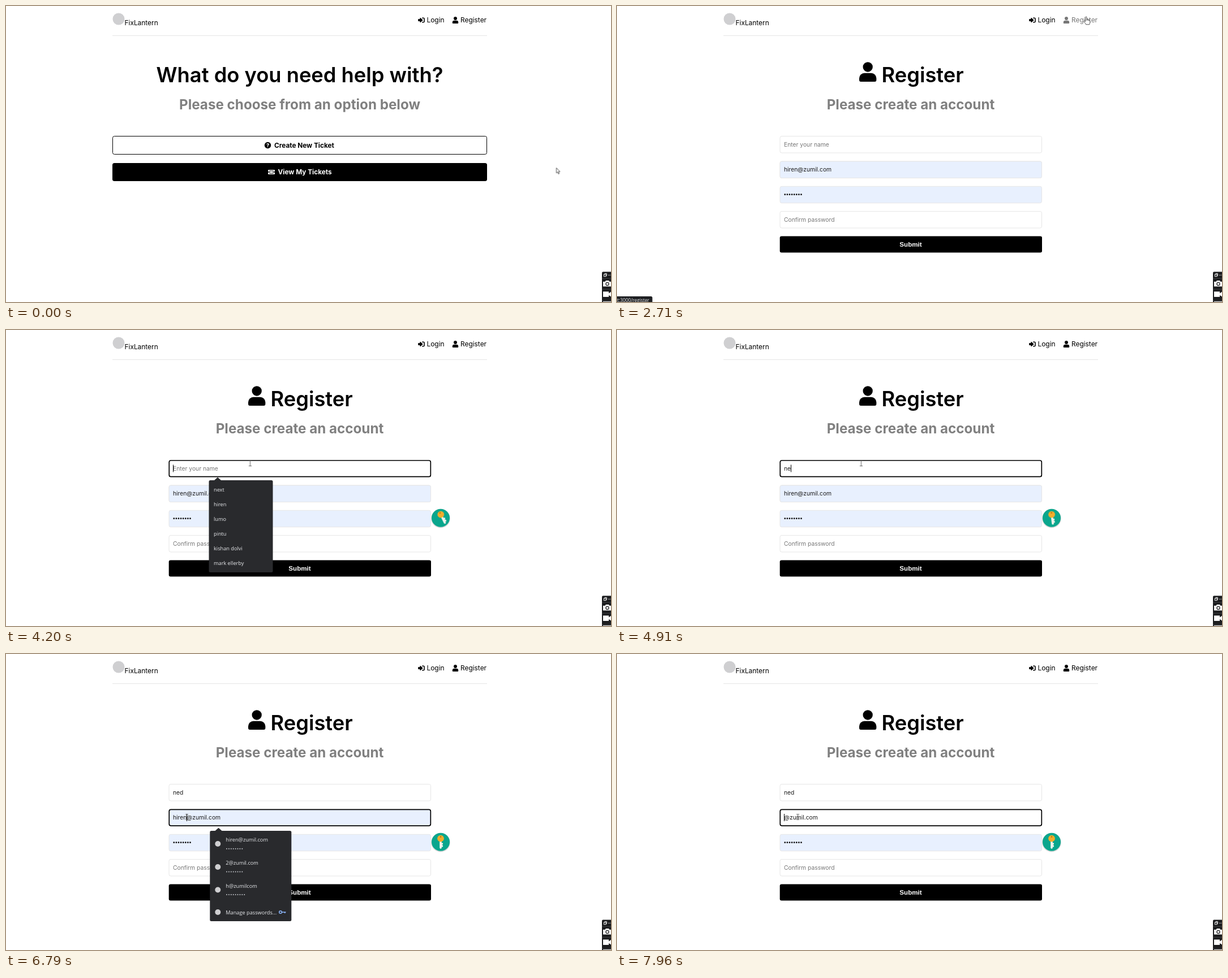
Animation of 1069 by 524 pixels, one loop 8 s. Source, as an HTML page:

```html
<!DOCTYPE html>
<html lang="en">
<head>
<meta charset="utf-8">
<title>Help desk sign-up</title>
<style>
  html, body { margin: 0; width: 100%; height: 100%; overflow: hidden; background: #fff; }
  svg { display: block; width: 1069px; height: 524px; }
  text { font-family: Inter, "Open Sans", sans-serif; white-space: pre; }
  .mid { text-anchor: middle; }
  .nav { font-size: 11.9px; }
  .h1 { font-size: 36.3px; font-weight: 600; }
  .h2 { font-size: 24.2px; font-weight: 700; fill: #808080; }
  .btn { font-size: 11.8px; font-weight: 700; }
  .in { font-size: 10.3px; fill: #1c1c1c; }
  .hint { font-size: 10.3px; fill: #777; }
  .submit { font: 700 11.6px "Liberation Sans", Arial, sans-serif; fill: #fff; }
  .pop text { font: 9.2px "Open Sans", "Noto Sans", sans-serif; fill: #e8eaed; }
  .pop { fill: #292a2d; }
  .field { fill: #fff; stroke: #e6e6e6; }
  .auto { fill: #e8f0fe; }
  .focus { fill: none; stroke: #000; stroke-width: 1.7; }
  .dots { fill: none; stroke-linecap: round; }

  /* 1% of the loop is 80 ms */
  .s { animation: 8s step-end infinite; }
  .m { animation: 8s linear infinite; }

  .home { animation-name: home; }
  .reg { animation-name: reg; }
  .link { animation-name: link; }
  .status { animation-name: status; }
  @keyframes home { 0% { opacity: 1 } 33.875%, 100% { opacity: 0 } }
  @keyframes reg { 0% { opacity: 0 } 33.875%, 100% { opacity: 1 } }
  @keyframes link { 0% { fill: #000 } 17.2% { fill: #777 } 40.6%, 100% { fill: #000 } }
  @keyframes status { 0%, 21% { opacity: 0 } 21.75%, 44.2% { opacity: 1 } 45.5%, 100% { opacity: 0 } }

  /* name field */
  .focus1 { animation-name: focus1; }
  .hint1 { animation-name: hint1; }
  .n1 { animation-name: n1; }
  .n2 { animation-name: n2; }
  .n3 { animation-name: n3; }
  .caret1 { animation-name: caret1; }
  .pop1 { animation-name: pop1; }
  @keyframes focus1 { 0% { opacity: 0 } 48.125% { opacity: 1 } 84.5%, 100% { opacity: 0 } }
  @keyframes hint1 { 0% { opacity: 1 } 55%, 100% { opacity: 0 } }
  @keyframes n1 { 0% { opacity: 0 } 55% { opacity: 1 } 59.375%, 100% { opacity: 0 } }
  @keyframes n2 { 0% { opacity: 0 } 59.375% { opacity: 1 } 63%, 100% { opacity: 0 } }
  @keyframes n3 { 0% { opacity: 0 } 63%, 100% { opacity: 1 } }
  @keyframes caret1 {
    0% { opacity: 0; transform: none }
    48.125% { opacity: 1; transform: none }
    55% { opacity: 1; transform: translateX(6px) }
    59.375% { opacity: 1; transform: translateX(12px) }
    63% { opacity: 1; transform: translateX(19px) }
    70% { opacity: 0; transform: translateX(19px) }
    76.25% { opacity: 1; transform: translateX(19px) }
    82.625%, 100% { opacity: 0; transform: translateX(19px) }
  }
  @keyframes pop1 { 0%, 49% { opacity: 0 } 49.8%, 55.25% { opacity: 1 } 57.75%, 100% { opacity: 0 } }

  /* e-mail field */
  .fill2 { animation-name: fill2; }
  .focus2 { animation-name: focus2; }
  .e0 { animation-name: e0; }
  .e1 { animation-name: e1; }
  .e2 { animation-name: e2; }
  .e3 { animation-name: e3; }
  .e4 { animation-name: e4; }
  .e5 { animation-name: e5; }
  .caret2 { animation-name: caret2; }
  .pop2 { animation-name: pop2; }
  @keyframes fill2 { 0% { opacity: 1 } 88.625%, 100% { opacity: 0 } }
  @keyframes focus2 { 0% { opacity: 0 } 84.5%, 100% { opacity: 1 } }
  @keyframes e0 { 0% { opacity: 1 } 88.625%, 100% { opacity: 0 } }
  @keyframes e1 { 0% { opacity: 0 } 88.625% { opacity: 1 } 91.125%, 100% { opacity: 0 } }
  @keyframes e2 { 0% { opacity: 0 } 91.125% { opacity: 1 } 93.25%, 100% { opacity: 0 } }
  @keyframes e3 { 0% { opacity: 0 } 93.25% { opacity: 1 } 95.75%, 100% { opacity: 0 } }
  @keyframes e4 { 0% { opacity: 0 } 95.75% { opacity: 1 } 99.45%, 100% { opacity: 0 } }
  @keyframes e5 { 0% { opacity: 0 } 99.45%, 100% { opacity: 1 } }
  @keyframes caret2 {
    0% { opacity: 0; transform: translateX(24px) }
    84.5% { opacity: 1; transform: translateX(24px) }
    88.625% { opacity: 1; transform: translateX(19px) }
    91.125% { opacity: 1; transform: translateX(13px) }
    93.25% { opacity: 1; transform: translateX(8px) }
    95.75% { opacity: 0; transform: translateX(6px) }
    97.75% { opacity: 1; transform: translateX(6px) }
    99.45%, 100% { opacity: 1; transform: none }
  }
  @keyframes pop2 { 0%, 84.375% { opacity: 0 } 84.875%, 88.625% { opacity: 1 } 91.125%, 100% { opacity: 0 } }

  /* key badge */
  .badge { animation-name: badge; transform-origin: 768px 333px; }
  .key { animation-name: grow; transform-origin: 768px 326px; }
  .swing { animation: swing 8s ease-in-out infinite; transform-origin: 768px 326px; }
  .shaft { animation-name: shaft; transform-origin: 768px 326px; }
  @keyframes badge { 0%, 37% { transform: scale(0) } 38.8%, 100% { transform: none } }
  @keyframes grow { 0%, 38.6% { transform: scale(0) } 39.625% { transform: scale(.58) } 41.5%, 100% { transform: none } }
  @keyframes shaft { 0%, 39.7% { transform: scaleY(0) } 41.8%, 100% { transform: none } }
  @keyframes swing {
    0%, 42.5% { transform: none }
    45.6%, 52.5% { transform: rotate(-26deg) }
    49%, 56% { transform: rotate(26deg) }
    59.5% { transform: rotate(-14deg) }
    63.3%, 100% { transform: none }
  }

  /* pointer */
  .pointer { animation: path 8s ease-in-out infinite; }
  .arrow { animation-name: arrow; }
  .hand { animation-name: hand; }
  .beam { animation-name: beam; }
  @keyframes path {
    0%, 8.25% { transform: translate(972.5px, 286.5px) }
    11.875%, 15.625% { transform: translate(819.5px, 30.5px) }
    17.2% { transform: translate(827px, 2px) }
    18.375% { transform: translate(828px, 13px) }
    21.75%, 24.25% { transform: translate(829px, 18px) }
    25.125%, 40% { transform: translate(829px, 19px) }
    43.75% { transform: translate(560px, 233px) }
    46.5%, 71% { transform: translate(431.5px, 236px) }
    74.375% { transform: translate(296.5px, 270.5px) }
    79.75%, 100% { transform: translate(319.5px, 288.5px) }
  }
  @keyframes arrow { 0% { opacity: 1 } 16.2% { opacity: 0 } 40.6% { opacity: 1 } 43.8% { opacity: 0 } 73.1% { opacity: 1 } 76.4%, 100% { opacity: 0 } }
  @keyframes hand { 0% { opacity: 0 } 16.2% { opacity: 1 } 40.6%, 100% { opacity: 0 } }
  @keyframes beam { 0% { opacity: 0 } 43.8% { opacity: 1 } 73.1% { opacity: 0 } 76.4%, 100% { opacity: 1 } }
</style>
</head>
<body>
<svg viewBox="0 0 1069 524">
  <defs>
    <g id="user">
      <circle cx="224" cy="128" r="128"/>
      <path d="M0 470V422A134 134 0 0 1 134 288H314A134 134 0 0 1 448 422V470A42 42 0 0 1 406 512H42A42 42 0 0 1 0 470Z"/>
    </g>
  </defs>
  <rect width="1069" height="524" fill="#fff"/>

  <!-- header -->
  <circle cx="199" cy="23" r="10.5" fill="#cfcfd1"/>
  <text class="nav" x="209.5" y="33.5">FixLantern</text>
  <g transform="translate(728 19) scale(.0235)">
    <path d="M24 190H165V90L355 256L165 422V322H24Z" stroke="#000" stroke-width="36" stroke-linejoin="round"/>
    <path d="M330 96H410Q470 96 470 150V362Q470 416 410 416H330" fill="none" stroke="#000" stroke-width="66" stroke-linecap="round"/>
  </g>
  <text class="nav" x="743.5" y="29">Login</text>
  <g class="s link">
    <use href="#user" transform="translate(788.8 19) scale(.0232)"/>
    <text class="nav" x="803" y="29">Register</text>
  </g>
  <path d="M188 52.5H850" stroke="#e6e6e6"/>

  <!-- start page -->
  <g class="s home">
    <text class="h1 mid" x="519" y="134.5">What do you need help with?</text>
    <text class="h2 mid" x="519" y="183">Please choose from an option below</text>
    <rect x="188.5" y="230.5" width="661" height="32" rx="3" fill="#fff" stroke="#000"/>
    <circle cx="462.5" cy="246.5" r="5.7"/>
    <text x="462.5" y="249.8" class="mid" font-size="9" font-weight="800" fill="#fff">?</text>
    <text class="btn" x="474" y="250.5">Create New Ticket</text>
    <rect x="188" y="278" width="662" height="32" rx="3.5"/>
    <path d="M464 290H474Q475 290 475 291V292.5A1.4 1.4 0 0 0 475 295.3V297Q475 298 474 298H464Q463 298 463 297V295.3A1.4 1.4 0 0 0 463 292.5V291Q463 290 464 290Z" fill="#fff"/>
    <rect x="465.8" y="291.9" width="6.4" height="4.2" fill="none" stroke="#000" stroke-width=".9"/>
    <text class="btn" x="480.5" y="297.8" fill="#fff">View My Tickets</text>
  </g>

  <!-- sign-up page -->
  <g class="s reg">
    <use href="#user" transform="translate(428 99.3) scale(.0677)"/>
    <text class="h1" x="467.5" y="134.5">Register</text>
    <text class="h2 mid" x="519" y="183">Please create an account</text>

    <rect class="field" x="288" y="230.5" width="462.5" height="29.5" rx="3"/>
    <rect class="field" x="288" y="275" width="462.5" height="29.5" rx="3"/>
    <rect class="field auto s fill2" x="288" y="275" width="462.5" height="29.5" rx="3"/>
    <rect class="field auto" x="288" y="319.3" width="462.5" height="29.5" rx="3"/>
    <rect class="field" x="288" y="363.5" width="462.5" height="29.5" rx="3"/>
    <rect x="287.7" y="407.5" width="463.3" height="29" rx="3"/>
    <text class="submit mid" x="519" y="425.8">Submit</text>
    <rect class="focus s focus1" x="288.3" y="231" width="462" height="28.7" rx="3"/>
    <rect class="focus s focus2" x="288.3" y="275.4" width="462" height="28.7" rx="3"/>

    <text class="hint s hint1" x="295" y="248.5">Enter your name</text>
    <text class="in s n1" x="295" y="248.5">n</text>
    <text class="in s n2" x="295" y="248.5">ne</text>
    <text class="in s n3" x="295" y="248.5">ned</text>
    <rect class="s caret1" x="295" y="238.5" width="1" height="13"/>

    <text class="in s e0" x="295" y="292.7">hiren@zumil.com</text>
    <text class="in s e1" x="295" y="292.7">hire@zumil.com</text>
    <text class="in s e2" x="295" y="292.7">hir@zumil.com</text>
    <text class="in s e3" x="295" y="292.7">hi@zumil.com</text>
    <text class="in s e4" x="295" y="292.7">h@zumil.com</text>
    <text class="in s e5" x="295" y="292.7">@zumil.com</text>
    <rect class="s caret2" x="295" y="283" width="1" height="13"/>

    <path class="dots" d="M296.8 333.7H326" stroke="#111" stroke-width="2.8" stroke-dasharray="0 4.1"/>
    <text class="hint" x="295" y="381.5">Confirm password</text>

    <g class="m badge">
      <circle cx="768" cy="333.6" r="16.8" fill="#000" opacity=".16"/>
      <circle cx="768" cy="332.8" r="16" fill="#0aa68d"/>
      <g class="m key"><g class="swing">
        <path class="m shaft" d="M766.2 330H769.8V334.5H772V337H770.6V338.6H772V341.6H769.8V343.4L768 345L766.2 343.4Z" fill="#f4f4ee"/>
        <circle cx="768" cy="326.6" r="5.9" fill="#f3ad2b"/>
        <circle cx="768" cy="323.6" r="1.3" fill="#b5761a"/>
      </g></g>
    </g>
  </g>

  <!-- name suggestions -->
  <g class="pop m pop1">
    <rect x="358.5" y="266" width="113" height="163" rx="2.5"/>
    <path d="M367.5 266.5L374 260.8L380.5 266.5Z"/>
    <text x="367" y="286">next</text>
    <text x="367" y="311.9">hiren</text>
    <text x="367" y="337.8">lumo</text>
    <text x="367" y="363.7">pintu</text>
    <text x="367" y="389.6">kishan dolvi</text>
    <text x="367" y="415.5">mark ellerby</text>
  </g>

  <!-- saved log-ins -->
  <g class="pop m pop2">
    <rect x="360.3" y="313" width="144" height="160" rx="2.5"/>
    <path d="M369 313.5L375.5 307.8L382 313.5Z"/>
    <g fill="#cfcfd1">
      <circle cx="374.3" cy="336" r="5"/>
      <circle cx="374.3" cy="377" r="5"/>
      <circle cx="374.3" cy="417.5" r="5"/>
      <circle cx="374.3" cy="457" r="5"/>
    </g>
    <text x="388.3" y="332.3">hiren@zumil.com</text>
    <text x="388.3" y="373">2@zumil.com</text>
    <text x="388.3" y="413.7">h@zumilcom</text>
    <text x="388.3" y="460.7">Manage passwords...</text>
    <path class="dots" d="M390 344.8H418M390 385.4H418M390 426H422" stroke="#c4c7cc" stroke-width="2" stroke-dasharray="0 3.9"/>
    <circle cx="485" cy="457" r="2.3" fill="none" stroke="#8ab4f8" stroke-width="1.5"/>
    <path d="M487.5 457H494.5M492.7 457V459" fill="none" stroke="#8ab4f8" stroke-width="1.5"/>
  </g>

  <!-- link address -->
  <g class="m status">
    <path d="M0 514H60Q62.5 514 62.5 516.5V524H0Z" fill="#1f2023"/>
    <text x="57" y="524" text-anchor="end" fill="#e8eaed" style="font:8.3px 'Open Sans','Noto Sans',sans-serif">localhost:3000/register</text>
  </g>

  <!-- recorder bar -->
  <path d="M1069 470.5H1055Q1053 470.5 1053 472.5V524H1069Z" fill="#1b1c1e"/>
  <g fill="none" stroke="#fff" stroke-width=".9">
    <rect x="1056.5" y="475" width="3.6" height="3.8"/>
    <path d="M1058 475V473.7H1061.4V477.4H1060"/>
  </g>
  <path class="dots" d="M1064.8 476.4H1070" stroke="#fff" stroke-width="1.3" stroke-dasharray="0 2.4"/>
  <path d="M1053 482.5H1069M1053 501.5H1069M1053 521.5H1069" stroke="#3a3b3e"/>
  <path d="M1055 488H1058.5L1060 486H1065L1066.5 488H1069V496.5H1055Z" fill="#fff"/>
  <circle cx="1062.5" cy="492" r="2.6" fill="#fff" stroke="#1b1c1e" stroke-width="1.2"/>
  <path d="M1055 505.5H1065V508.5L1069 506V514.5L1065 512V515H1055Z" fill="#fff"/>
  <path d="M1055 523.5H1069" stroke="#fff"/>

  <!-- pointer -->
  <g class="pointer">
    <path class="s arrow" d="M0 0V9.2L2.1 7.4L3.6 10.8L5.1 10.1L3.6 6.8H6.4Z" fill="#fff" stroke="#222" stroke-width=".8"/>
    <path class="s hand" d="M-1.2 8.6V1.2Q-1.2 0 0 0Q1.1 0 1.1 1.2V4.8Q1.6 4 2.4 4.3Q3.1 4.5 3.2 5.2Q4.5 4.5 5 5.7Q6.8 5.3 6.8 7V9.4Q6.8 11.5 5.7 13.8H-.3Q-1.4 11.6 -3.6 9Q-4.4 7.8 -3.3 7.2Q-2.3 6.9 -1.2 8.6ZM1.1 4.8V7M3.2 5.2V7M5 5.7V7.4" fill="#fff" stroke="#333" stroke-width=".85" stroke-linejoin="round"/>
    <path class="s beam" d="M-2.5 -4.7H2.5M0 -4.7V4.7M-2.5 4.7H2.5" fill="none" stroke="#555" stroke-width=".95"/>
  </g>
</svg>
</body>
</html>
```
